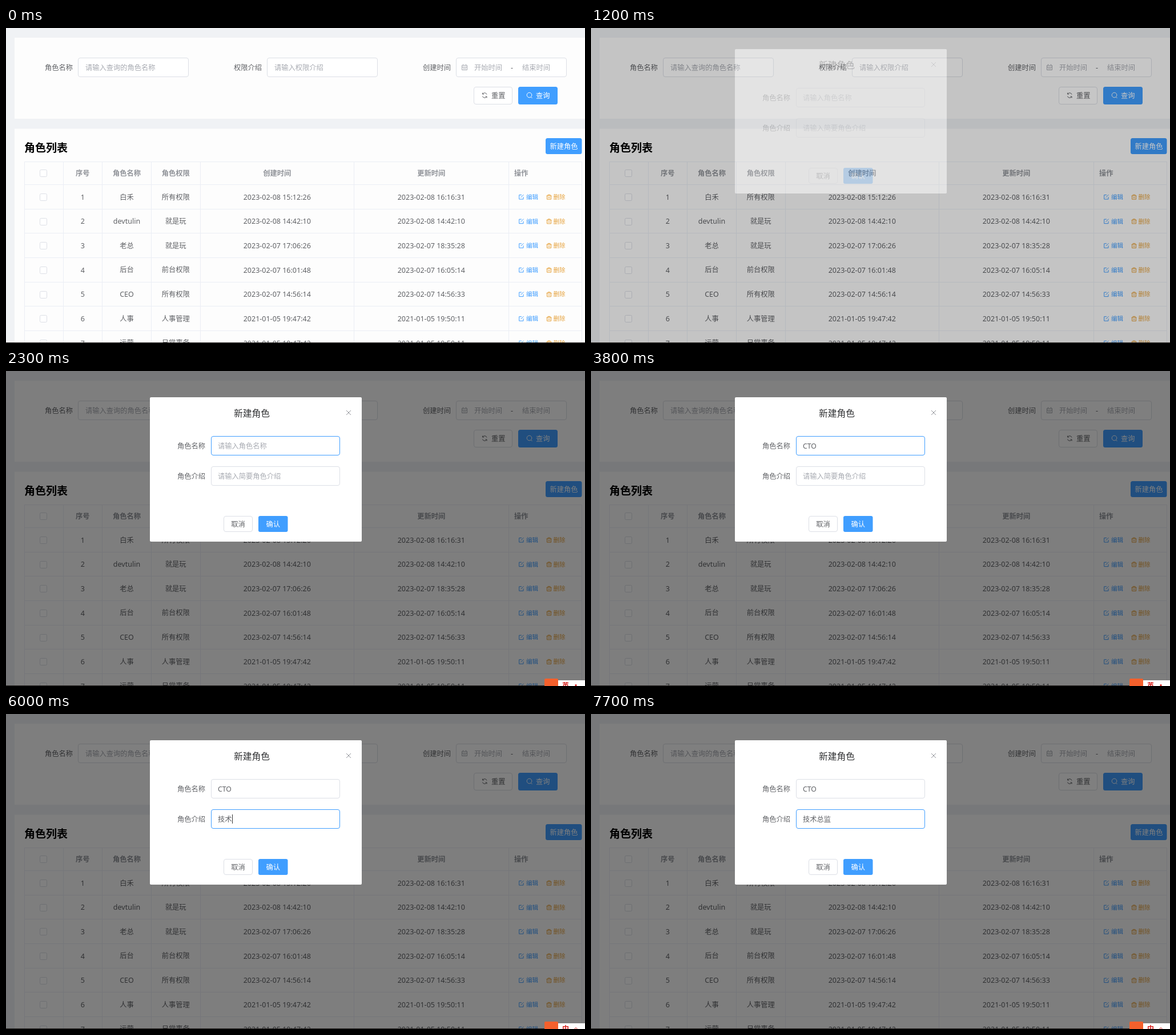
These frames come from a looping animation (1014 px wide and 552 px high, 8 s). An HTML page:

```html
<!DOCTYPE html>
<html lang="zh-CN">
<head>
<meta charset="utf-8">
<title>角色列表</title>
<style>
  html, body { margin: 0; width: 100%; height: 100%; overflow: hidden; background: #f0f2f5; }
  svg { display: block; width: 1014px; height: 552px; }
  text { font: 12.25px "Noto Sans", "Noto Sans CJK SC", "Noto Sans CJK", sans-serif; fill: #606266; white-space: pre; }
  .hint { fill: #a8abb2; }
  .head { font-weight: 700; fill: #909399; }
  .date { font-size: 12.5px; }
  .title { font-size: 19px; font-weight: 700; fill: #000; }
  .caption { font-size: 15.75px; fill: #303133; }
  .white { fill: #fff; }
  .link { font-size: 10.5px; }
  .pick { font-size: 14px; fill: #333; }
  .mode { font-size: 12px; font-weight: 700; fill: #d8201c; }
  .line { fill: none; stroke-width: 1; }
</style>
</head>
<body>
<svg id="stage" viewBox="0 0 1014 552" xmlns="http://www.w3.org/2000/svg"></svg>
<script>
const BLUE = '#409eff', ORANGE = '#e6a23c', GREY = '#dcdfe6', LOOP = 8000;

const box = (x, y, w, h, fill, extra = '') =>
  `<rect x="${x}" y="${y}" width="${w}" height="${h}" fill="${fill}" ${extra}/>`;
const text = (x, y, s, cls = '', extra = '') =>
  `<text x="${x}" y="${y}" dy=".37em" class="${cls}" ${extra}>${s}</text>`;
const mid = (x, y, s, cls, extra = '') => text(x, y, s, cls, `text-anchor="middle" ${extra}`);
const path = (d, color, extra = '') => `<path d="${d}" class="line" stroke="${color}" ${extra}/>`;
const field = (x, y, w, h, id = '') =>
  box(x + .5, y + .5, w - 1, h - 1, '#fff', `rx="3.5" stroke="${GREY}" ${id && `id="${id}"`}`);

function searchPanel() {
  return box(15, 17, 999, 142, '#fdfdfd') +
    text(68, 69, '角色名称') + field(126, 52, 194, 34) + text(139, 69, '请输入查询的角色名称', 'hint') +
    text(399, 69, '权限介绍') + field(457, 52, 194, 34) + text(470, 69, '请输入权限介绍', 'hint') +
    text(730, 69, '创建时间') + field(788, 52, 194, 34) +
    path('M798.5 65.5h9v8h-9zM798.5 68.5h9M800.5 63.5v2M805.5 63.5v2M800 71h6', '#a8abb2') +
    text(820, 69, '开始时间', 'hint') + mid(886, 69, '-') + text(904, 69, '结束时间', 'hint') +
    field(819, 103, 68, 31) +
    path('M842 116.5a4 4 0 0 0-7.3-.8M834.6 113.5v2.5h2.5M834.5 119.5a4 4 0 0 0 7.3.8M842 122.5v-2.5h-2.5', '#606266') +
    text(850, 118, '重置') +
    box(897, 103, 69, 31, BLUE, 'rx="3.5"') +
    '<circle cx="916.5" cy="117.5" r="4.3" class="line" stroke="#fff"/>' + path('M919.5 121l2 2', '#fff') +
    text(928, 118, '查询', 'white');
}

const cols = [32, 100, 168.5, 254.5, 340, 609.5, 880, 1008];
const center = i => (cols[i] + cols[i + 1]) / 2;
const rowY = i => 296 + 42.65 * i;
const rows = [
  ['白禾', '所有权限', '2023-02-08 15:12:26', '2023-02-08 16:16:31'],
  ['devtulin', '就是玩', '2023-02-08 14:42:10', '2023-02-08 14:42:10'],
  ['老总', '就是玩', '2023-02-07 17:06:26', '2023-02-07 18:35:28'],
  ['后台', '前台权限', '2023-02-07 16:01:48', '2023-02-07 16:05:14'],
  ['CEO', '所有权限', '2023-02-07 14:56:14', '2023-02-07 14:56:33'],
  ['人事', '人事管理', '2021-01-05 19:47:42', '2021-01-05 19:50:11'],
  ['运营', '日常事务', '2021-01-05 19:47:42', '2021-01-05 19:50:11']
];
const check = y => box(59.5, Math.round(y) - 5.5, 12, 12, '#fff', `rx="2" stroke="${GREY}"`);

const actions = y => `<g transform="translate(898 ${y - 4.5})">` +
  path('M5 1H.7V8.5H8V4.5M3.5 5.5L8.5.5', BLUE) +
  path('M48.5 2.5h9M51 2.5V.7h4V2.5M49.5 2.5V8.7h7V2.5M52 4.5v2.5M54 4.5v2.5', ORANGE) + '</g>' +
  text(911, y, '编辑', 'link', `style="fill:${BLUE}"`) +
  text(958.5, y, '删除', 'link', `style="fill:${ORANGE}"`);

function table() {
  const heads = ['序号', '角色名称', '角色权限', '创建时间', '更新时间'];
  let s = box(15, 176.5, 999, 376, '#fdfdfd') + text(32, 210, '角色列表', 'title') +
    box(945, 193, 63.5, 28, BLUE, 'rx="3.5" id="create"') + mid(977, 207, '新建角色', 'white');
  let grid = 'M32 234.5H1008';
  cols.forEach(x => grid += `M${Math.floor(x) + .5} 234V552`);
  rows.forEach((r, i) => grid += `M32 ${Math.round(274 + 42.65 * i) + .5}H1008`);
  s += path(grid, '#ebeef5') + check(254) + text(890, 254, '操作', 'head');
  heads.forEach((h, i) => s += mid(center(i + 1), 254, h, 'head'));
  rows.forEach((r, i) => {
    const y = rowY(i);
    s += check(y) + mid(center(1), y, i + 1, 'date') + actions(y);
    r.forEach((v, k) => s += mid(center(k + 2), y, v, /^\w/.test(v) ? 'date' : ''));
  });
  return s;
}

function dialog() {
  return box(252, 46, 371, 253, '#fff', 'rx="2"') +
    mid(430.5, 74, '新建角色', 'caption') + path('M596 69l8 8M604 69l-8 8', '#909399') +
    text(300, 131, '角色名称') + field(359, 114, 226, 34, 'edge0') +
    text(371, 131, '请输入角色名称', 'hint', 'id="hint0"') + text(371, 131, '', '', 'id="value0"') +
    text(300, 184, '角色介绍') + field(359, 167, 226, 34, 'edge1') +
    text(371, 184, '请输入简要角色介绍', 'hint', 'id="hint1"') + text(371, 184, '', '', 'id="value1"') +
    box(371, 123, 1, 16, '#333', 'id="caret0"') + box(371, 176, 1, 16, '#333', 'id="caret1"') +
    field(381, 254, 51, 28) + mid(406.5, 268, '取消') +
    box(442, 254, 51.5, 28, BLUE, 'rx="3"') + mid(467.7, 268, '确认', 'white');
}

const inputBar = () => '<g id="bar">' + box(966, 542, 48, 10, '#fff') +
  box(943, 539, 24, 24, '#f4602c', 'rx="2"') + mid(980, 552, '', 'mode', 'id="mode"') +
  '<circle id="dot" cx="998" cy="550.5" r="1.6" fill="#d8201c"/>' +
  path('M995.5 552l2.5-2.5 2.5 2.5', '#d8201c', 'id="tick"') + '</g>';

const popup = () => '<g id="popup">' + box(0, 209.5, 10, 31, '#fff', 'id="panel" rx="2" stroke="#d9dce2"') +
  text(0, 225, '', 'pick', 'id="picks"') + '<circle id="badge" cy="208" r="14" fill="#f4602c"/></g>';

const stage = document.getElementById('stage');
stage.innerHTML = box(0, 0, 1014, 552, '#f0f2f5') + searchPanel() + table() +
  '<g id="mask">' + box(0, 0, 1014, 552, '#000', 'opacity=".5"') + `<g id="dialog">${dialog()}</g></g>` +
  box(0, 551, 1014, 1, '#1c1917') + inputBar() + popup();
const el = {};
stage.querySelectorAll('[id]').forEach(n => el[n.id] = n);

// Each table holds [start time, value] steps.
const HALF = '#8ebff3';
const steps = {
  create: [[0, BLUE], [600, '#62afff'], [700, '#79bbff'], [1100, BLUE]],
  edges: [
    [[0, GREY], [1800, HALF], [1900, BLUE], [4400, HALF], [4500, GREY]],
    [[0, GREY], [4200, '#c0c4cc'], [4400, HALF], [4500, BLUE]]
  ],
  carets: [
    [[0, 0], [1800, 1], [2300, 0], [2600, 1], [3800, 0], [4200, 1], [4400, 0]],
    [[0, 0], [4400, 1], [4900, 0], [5400, 1], [7700, 0]]
  ],
  values: [
    [[0, ''], [2600, 'C'], [3100, 'CT'], [3300, 'CTO']],
    [[0, ''], [5700, 'j'], [5800, 'ji'], [5900, 'jis'], [6000, '技术'], [6400, '技术z'], [6600, '技术zo'],
     [6900, '技术zon'], [7000, '技术zong'], [7100, '技术zongj'], [7200, '技术总监']]
  ],
  mode: [[0, ''], [2000, '中'], [2300, '英'], [5400, '中']],
  popup: [
    [0, null], [5700, [371, 612, '就将及家级']], [5800, [371, 612, '几及记级既']],
    [5900, [371, 684, '技术 计算 结束 即使 及时']], [6000, null],
    [6400, [395, 635, '在中这怎最']], [6600, [395, 635, '走做总左座']], [6900, [395, 635, '总中宗综纵']],
    [7000, [395, 635, '总宗综纵踪']], [7100, [395, 756, '总监 总结 总计 总经理 总局']], [7200, null]
  ]
};
const at = (list, t) => list.reduce((v, s) => t >= s[0] ? s[1] : v, list[0][1]);
const show = (node, on) => node.setAttribute('visibility', on ? 'visible' : 'hidden');

// CSS "ease": cubic-bezier(.25, .1, .25, 1)
function ease(x) {
  if (x <= 0 || x >= 1) return x <= 0 ? 0 : 1;
  let lo = 0, hi = 1, u = .5;
  for (let i = 0; i < 20; i++) {
    u = (lo + hi) / 2;
    if (.75 * u * (1 - u) + u ** 3 < x) lo = u; else hi = u;
  }
  return .3 * u * (1 - u) ** 2 + 3 * u * u * (1 - u) + u ** 3;
}

function drawField(i, t) {
  const value = at(steps.values[i], t), node = el['value' + i];
  node.innerHTML = i ? value.replace(/[a-z]+/, '<tspan text-decoration="underline">$&</tspan>') : value;
  show(el['hint' + i], !value);
  el['edge' + i].setAttribute('stroke', at(steps.edges[i], t));
  el['caret' + i].setAttribute('x', 371 + Math.round(value ? node.getComputedTextLength() : 0));
  show(el['caret' + i], at(steps.carets[i], t));
}

function drawPopup(data) {
  show(el.popup, data);
  if (!data) return;
  const [left, right, words] = data;
  const list = words.includes(' ') ? words.split(' ') : [...words];
  el.panel.setAttribute('x', left + .5);
  el.panel.setAttribute('width', right - left - 1);
  el.badge.setAttribute('cx', right - 15);
  el.picks.setAttribute('x', left + 20);
  el.picks.innerHTML = list.map((w, i) =>
    `<tspan fill="${i ? '#333' : '#e0542a'}" dx="${i ? 9 : 0}">${i + 1}.${w}</tspan>`).join('');
}

function draw(t) {
  const fade = ease((t - 1120) / 300), drop = ease((t - 1105) / 300);
  el.mask.setAttribute('opacity', fade);
  el.dialog.setAttribute('opacity', drop);
  el.dialog.setAttribute('transform', `translate(0 ${Math.round(-20 * (1 - drop))})`);
  el.create.setAttribute('fill', at(steps.create, t));
  drawField(0, t);
  drawField(1, t);
  const mode = at(steps.mode, t);
  el.bar.style.display = mode ? '' : 'none';
  el.mode.textContent = mode;
  show(el.dot, mode === '英');
  show(el.tick, mode === '中');
  drawPopup(at(steps.popup, t));
}

const start = performance.now();
let last = -1;
function tick(now) {
  const t = Math.floor(Math.max(0, now - start) % LOOP / 100) * 100;
  if (t !== last) draw(last = t);
  requestAnimationFrame(tick);
}
draw(0);
requestAnimationFrame(tick);
</script>
</body>
</html>
```
